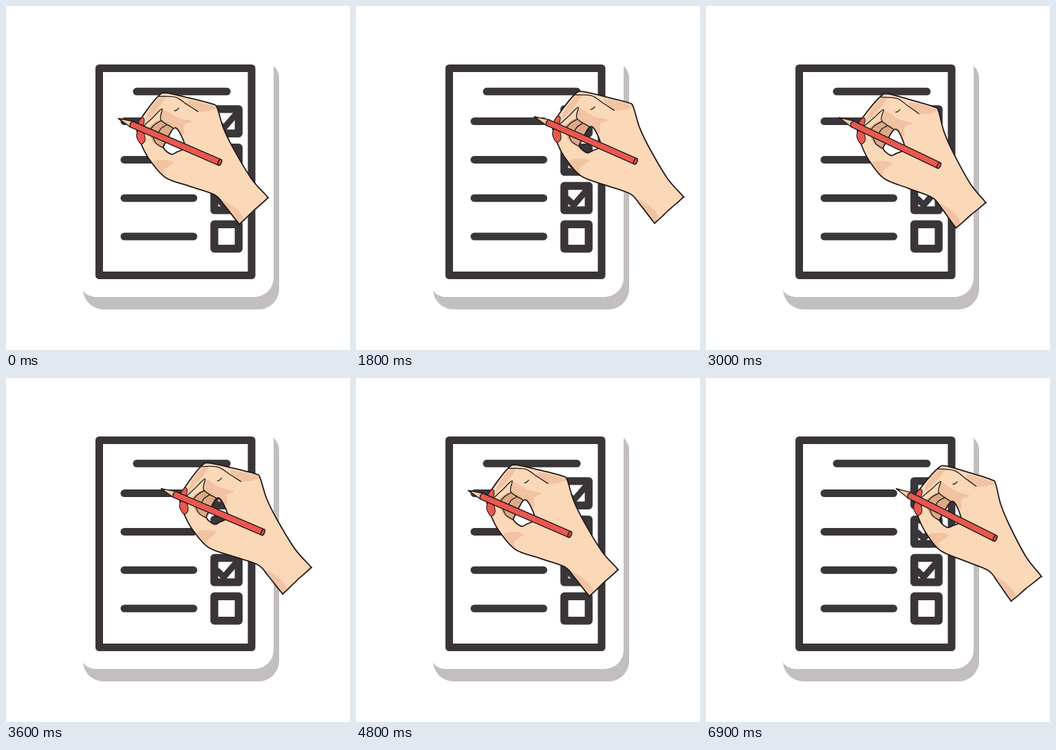
These frames come from a looping animation (500x500 px, 7060 ms). An HTML page with a canvas:

```html
<!DOCTYPE html>
<html lang="en">
<head>
<meta charset="utf-8">
<title>Checklist</title>
<style>
  html, body { margin: 0; width: 100%; height: 100%; overflow: hidden; background: #fff; }
  canvas { display: block; width: 500px; height: 500px; }
</style>
</head>
<body>
<canvas id="stage" width="500" height="500"></canvas>
<script>
const ctx = document.getElementById('stage').getContext('2d');
const LOOP = 7060, STEPS = 16;
const INK = '#393538', LINE = '#21191a', RED = '#e9584f';
const SKIN = '#fbd8b7', SHADE = '#f1c3a2', DEEP = '#dba987';
const TIP = [163, 163];

// Key points of the hand's tilt: [step, degrees].
const TILT = [[0, 0], [1, -1], [2, 2], [6, 2.5], [7, 0.4], [8, -0.2], [10, 1.4], [12, 0.4], [15, 4.7]];

function tiltAt(step) {
  const i = TILT.findIndex(key => key[0] >= step);
  if (i === 0) return TILT[0][1];
  const [[s0, a0], [s1, a1]] = [TILT[i - 1], TILT[i]];
  return a0 + (a1 - a0) * (step - s0) / (s1 - s0);
}

// The pencil moves right with a slight acceleration and rises over the first half.
function poseAt(step) {
  return {
    x: 163 + 7.4 * step + 0.05 * step * step,
    y: 163.4 - 2.6 * Math.min(1, step / 8),
    tilt: tiltAt(step) * Math.PI / 180
  };
}

// Smooth path through a flat list of x, y pairs.
function curve(flat, closed, path = new Path2D()) {
  const n = flat.length / 2;
  const at = i => {
    const k = closed ? (i + n) % n : Math.max(0, Math.min(n - 1, i));
    return [flat[2 * k], flat[2 * k + 1]];
  };
  path.moveTo(...at(0));
  for (let i = 0; i < (closed ? n : n - 1); i++) {
    const [a, b, c, d] = [at(i - 1), at(i), at(i + 1), at(i + 2)];
    path.bezierCurveTo(
      b[0] + (c[0] - a[0]) / 6, b[1] + (c[1] - a[1]) / 6,
      c[0] - (d[0] - b[0]) / 6, c[1] - (d[1] - b[1]) / 6, c[0], c[1]);
  }
  if (closed) path.closePath();
  return path;
}
const blob = (...p) => curve(p, true);
const stroke = (...p) => curve(p, false);

function polyline(...p) {
  const path = new Path2D();
  for (let i = 0; i < p.length; i += 2) path.lineTo(p[i], p[i + 1]);
  return path;
}

function polygon(...p) {
  const path = polyline(...p);
  path.closePath();
  return path;
}

function rect(x, y, w, h) {
  const path = new Path2D();
  path.rect(x, y, w, h);
  return path;
}

function paint(path, fill, line, width) {
  if (fill) { ctx.fillStyle = fill; ctx.fill(path, 'evenodd'); }
  if (line) { ctx.strokeStyle = line; ctx.lineWidth = width; ctx.stroke(path); }
}

// Outline from the index fingertip over the knuckles and wrist to the thumb.
const hand = blob(
  191, 173, 204, 152, 222, 130, 233, 126, 265, 133, 300, 142, 307, 148,
  316, 177, 330, 206, 357, 251, 379, 276, 379, 280, 360, 297, 341, 315, 337, 314,
  318, 290, 303, 274, 268, 262, 232, 249, 210, 225, 199, 206, 191, 184);
// Gap between thumb and fingers, open to the page behind.
curve([233, 196, 243, 178, 251, 181, 260, 204, 248, 212, 240, 215, 229, 206], true, hand);

const softShade = [
  blob(203, 166, 211, 147, 224, 132, 232, 131, 222, 147),
  blob(227, 150, 250, 162, 270, 167, 259, 173, 258, 187, 240, 176, 226, 166),
  blob(264, 137, 299, 144, 304, 149, 279, 153),
  blob(222, 224, 243, 226, 230, 238, 231, 246, 214, 230),
  blob(314, 283, 333, 293, 345, 308, 337, 315)
];
const fingers = blob(207, 180, 214, 171, 225, 166, 243, 177, 233, 196, 229, 206, 215, 198);
const creases = [
  stroke(222, 131, 246, 132, 262, 142, 279, 153),
  stroke(200, 174, 214, 161, 227, 149, 225, 165, 243, 177),
  stroke(226, 166, 216, 172, 209, 180),
  stroke(234, 172, 225, 178, 221, 186),
  stroke(245, 152, 248, 151, 251, 148),
  stroke(213, 188, 218, 199, 229, 206)
];
const thumbNail = blob(192, 181, 190, 190, 196, 200, 202, 195, 200, 184);
const indexNail = blob(191, 172, 197, 162, 201, 165, 198, 175);

function drawPage() {
  paint(new Path2D(
    'M112 412A22 12 0 0 0 130 423H361A28 28 0 0 0 389 395V87' +
    'A26 26 0 0 1 397 108V411A30 30 0 0 1 367 441H142A30 29 0 0 1 112 412Z'), '#c3bfbe');
  paint(rect(135.5, 90.5, 221.5, 301), '#fff', INK, 11);
  paint(polyline(190, 124.3, 321, 124.3), null, INK, 11);
  for (let i = 0; i < 4; i++) {
    const y = 167.6 + i * 55.8;
    paint(polyline(172, y, 272.5, y), null, INK, 11);
    paint(rect(302.8, y - 17.7, 35.4, 35.4), null, INK, 11.4);
    if (i < 3) paint(polyline(308, y + 1.5, 316.5, y + 10, 333, y - 9), null, INK, 9);
  }
}

function drawPencil() {
  ctx.save();
  ctx.translate(...TIP);
  ctx.rotate(Math.atan2(64, 148));
  paint(polygon(0, 0, 21, -4.6, 22, 4.6), '#f3cfa4', LINE, 1.3);
  paint(polygon(0, 0, 5, -1.2, 5, 1.2), LINE, LINE, 1);
  paint(polygon(21, -4.6, 161, -4.6, 161, 4.6, 21, 4.6, 19, 0), RED, LINE, 1.4);
  const end = new Path2D();
  end.ellipse(161, 0, 2.4, 4.6, 0, 0, Math.PI * 2);
  paint(end, '#cf4d46', LINE, 1.4);
  ctx.restore();
}

function drawHand({ x, y, tilt }) {
  ctx.save();
  ctx.translate(x, y);
  ctx.rotate(tilt);
  ctx.translate(-TIP[0], -TIP[1]);
  paint(hand, SKIN);
  ctx.save();
  ctx.clip(hand, 'evenodd');
  softShade.forEach(p => paint(p, SHADE));
  paint(fingers, DEEP);
  ctx.restore();
  creases.forEach(p => paint(p, null, LINE, 1.3));
  paint(hand, null, LINE, 1.8);
  paint(thumbNail, RED, LINE, 1.1);
  paint(indexNail, RED, LINE, 1.1);
  drawPencil();
  ctx.restore();
}

function draw(now) {
  const t = now % LOOP;
  const step = 2 * Math.floor(t / 300) + (t % 300 >= 170 ? 1 : 0);
  ctx.fillStyle = '#fff';
  ctx.fillRect(0, 0, 500, 500);
  ctx.lineCap = ctx.lineJoin = 'round';
  drawPage();
  drawHand(poseAt(step % STEPS));
}

const start = performance.now();
function tick() {
  draw(performance.now() - start);
  requestAnimationFrame(tick);
}
tick();
</script>
</body>
</html>
```
